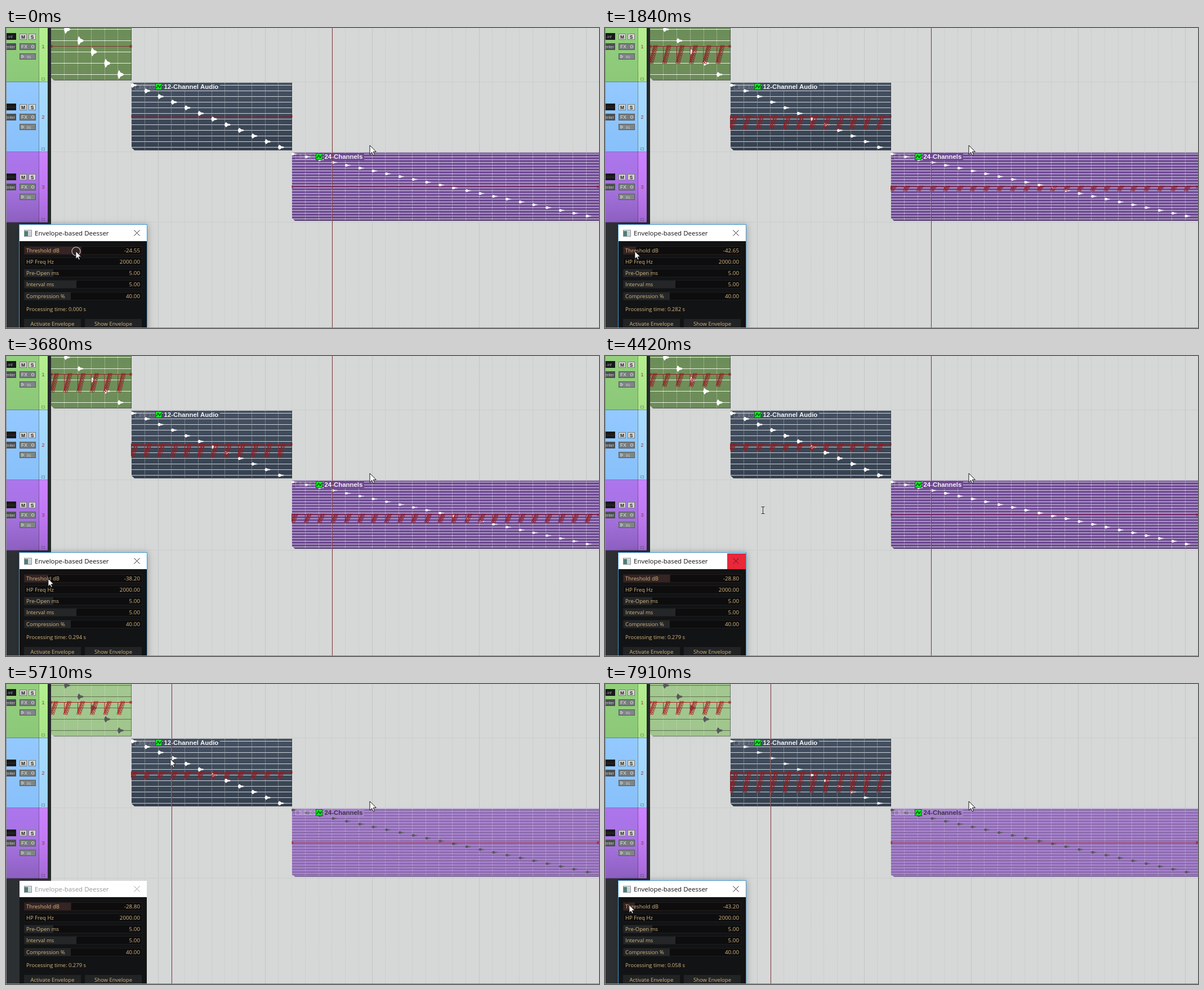
These frames come from a looping animation (1053 px wide and 532 px high, 8 s). An HTML page with a canvas:

```html
<!DOCTYPE html>
<html lang="en">
<head>
<meta charset="utf-8">
<title>Envelope-based Deesser</title>
<style>
html, body { margin: 0; width: 100%; height: 100%; overflow: hidden; background: #d6d8d7; }
canvas { display: block; }
</style>
</head>
<body>
<canvas id="stage" width="1053" height="532"></canvas>
<script>
const c = document.getElementById('stage').getContext('2d');
const W = 1053, H = 532, LOOP = 8000, TICK = 183.8, LEFT = 80, BEAT = 23.75;
const UI = '"Open Sans", "Noto Sans", sans-serif', SANS = '"Liberation Sans", Arial, sans-serif';

// tick, pointer x, pointer y, threshold, envelope depth on tracks 1, 2, 3
const keys = [
  [0, 124, 396, -24.55, 0, 0, 0],
  [2, 105, 396, -29, 0, 0, 0],
  [5, 82, 396, -36, 22, 13, 2],
  [6, 82, 396, -36, 22, 13, 2],
  [10, 53, 396, -42.65, 29, 22, 6],
  [12, 44, 396, -45.3, 38, 31, 25],
  [16, 35, 395, -47.45, 40, 34, 25],
  [18, 34, 395, -47.6, 40, 34, 25],
  [22, 115, 394, -28.8, 20, 10, 0],
  [23, 233, 362, -28.8, 20, 10, 0],
  [24, 280, 273, -28.8, 20, 10, 0],
  [27, 292, 133, -28.8, 20, 10, 0],
  [32, 292, 133, -28.8, 20, 10, 0],
  [35, 120, 396, -28.8, 20, 10, 0],
  [38, 187, 396, -12.37, 20, 0, 0],
  [39, 187, 396, -12.37, 20, 0, 0],
  [40, 158, 394, -12.37, 20, 0, 0],
  [43, 43, 392, -43.2, 20, 34, 0]
];

function stateAt(tick) {
  const i = keys.findIndex(k => k[0] > tick);
  if (i < 0) return keys[keys.length - 1];
  const a = keys[i - 1], b = keys[i], u = (tick - a[0]) / (b[0] - a[0]);
  return a.map((v, j) => v + (b[j] - v) * u);
}

function rect(x, y, w, h, fill) {
  c.fillStyle = fill;
  c.fillRect(x, y, w, h);
}

function box(x, y, w, h, stroke) {
  c.strokeStyle = stroke;
  c.lineWidth = 1;
  c.strokeRect(x + .5, y + .5, w - 1, h - 1);
}

function line(stroke, width, ...p) {
  c.strokeStyle = stroke;
  c.lineWidth = width;
  c.beginPath();
  for (let i = 0; i < p.length; i += 2) c.lineTo(p[i], p[i + 1]);
  c.stroke();
}

function poly(fill, ...p) {
  c.fillStyle = fill;
  c.beginPath();
  for (let i = 0; i < p.length; i += 2) c.lineTo(p[i], p[i + 1]);
  c.closePath();
  c.fill();
}

function ring(x, y, r) {
  c.beginPath();
  c.arc(x, y, r, 0, 7);
  c.stroke();
}

function text(s, x, y, fill, size, font = UI, align = 'left', weight = '') {
  c.font = `${weight} ${size}px ${font}`;
  c.textAlign = align;
  c.fillStyle = fill;
  c.fillText(s, x, y);
}

function dotted(stroke, ...p) {
  c.setLineDash([1, 1]);
  line(stroke, 1, ...p);
  c.setLineDash([]);
}

function vertical(colors, y0, y1) {
  const g = c.createLinearGradient(0, y0, 0, y1);
  colors.forEach((col, i) => g.addColorStop(i / (colors.length - 1), col));
  return g;
}

function arrange() {
  rect(0, 0, W, H, '#d6d8d7');
  for (let x = LEFT + BEAT, i = 1; x < W; x += BEAT, i++)
    dotted(i % 8 ? '#c4c7c6' : '#b0b3b2', Math.floor(x) + .5, 0, Math.floor(x) + .5, H);
  for (const y of [95.5, 219.5, 344.5]) dotted('#bfc2c1', LEFT, y, W, y);
}

function button(x, y, w, label) {
  rect(x, y, w, 11, '#d6d6d2');
  box(x, y, w, 11, '#7b7e78');
  text(label, x + w / 2, y + 9, '#222', 8.5, SANS, 'center', 'bold');
}

function trackPanel(n, top, h, y, panel, strip, meter) {
  rect(0, top, 58, h, vertical(panel, top, top + h));
  rect(58, top, 16, h, vertical(strip, top, top + h));
  rect(58, top, 1, h, 'rgba(0,0,0,.35)');
  rect(0, top + h - 1, 74, 1, 'rgba(0,0,0,.3)');
  rect(0, y - 6, 18, 12, '#17191a');
  if (n === 1) text('-inf', 2, y + 3, '#aaa', 7, SANS);
  else dotted(meter, 1, y + .5, 16, y + .5);
  button(24, y - 5, 13, 'M');
  button(40, y - 5, 13, 'S');
  rect(0, y + 12, 18, 12, '#4c5052');
  text('enter', 0, y + 21, '#d0d0d0', 7, SANS);
  rect(24, y + 12, 29, 12, '#777c7c');
  box(24, y + 12, 29, 12, '#555a5a');
  text('FX', 27, y + 21, '#e8e8e8', 8.5, SANS);
  c.strokeStyle = '#ddd';
  ring(47.5, y + 18, 2.3);
  rect(24, y + 30, 29, 11, '#7f8686');
  box(24, y + 30, 29, 11, '#555a5a');
  line('#ddd', 1, 28, y + 33, 32, y + 35.5, 28, y + 38, 28, y + 33);
  text('IN', 37, y + 38.5, '#ccc', 7, SANS);
  text(n, 66, y + 21, '#93303f', 9, SANS, 'center');
  box(63, top + h - 8, 6, 5, 'rgba(60,60,60,.4)');
}

function panels() {
  rect(0, 0, LEFT, H, '#2d3032');
  trackPanel(1, 0, 96, 15, ['#93cf7d', '#8bc878'], ['#b4ef90', '#a9e388'], '#333');
  trackPanel(2, 96, 124, 140, ['#93c9ff', '#88c0fb'], ['#a9dbff', '#9dd2fb'], '#a02a2a');
  trackPanel(3, 220, 125, 264, ['#ad75ee', '#a573df', '#8d5fc0'], ['#cb82ff', '#bf79f2', '#a469d5'], '#555');
  rect(74, 0, 6, 345, '#25282a');
}

// One gain dip per transient: a drop, then a slanted recovery of paired points
function envelope(o, depth) {
  const red = o.sel ? '#931d24' : '#b01c22', y = o.mid, end = Math.min(o.x1, W);
  line(depth < 1 ? 'rgba(140,20,40,.75)' : red, 1, o.x0, y + .5, end, y + .5);
  c.strokeStyle = red;
  c.strokeRect(o.x0 - 1, y - 1, 3, 3);
  c.strokeRect(end - 3, y - 1, 3, 3);
  if (depth < 1) return;
  const w = 4 + depth / 8, n = Math.ceil(depth / 4);
  for (let x = o.x0; x < end - 4; x += BEAT) {
    line(red, 1, x, y, x, y + depth, x + w, y);
    for (let i = 0; i <= n; i++) {
      const u = i / n, rise = x + w * u, v = y + .5 + depth * (1 - u);
      ring(rise, v, o.ring);
      ring(rise + 4, v, o.ring);
    }
  }
}

function item(o, depth) {
  const { x1, top, bottom, sel } = o, x0 = Math.ceil(o.x0), right = Math.min(x1, W);
  c.save();
  c.beginPath();
  c.rect(x0 - 1, 0, right - x0 + 2, H);
  c.clip();
  poly(vertical(sel ? o.dark : o.light, top, bottom),
    x0, top, x1, top, x1, bottom, x0 + 5, bottom, x0, bottom - 5);
  const wave = sel ? '#fff' : '#57585a', rule = sel ? o.rule : o.dimRule;
  const amp = o.amp * (1 - depth / 68);
  for (let k = 0; k < o.n; k++) {
    rect(x0, o.first + k * o.gap, right - x0, 1, rule);
    const x = Math.floor(o.x0 + k * BEAT) + .5;
    if (k) dotted(sel ? 'rgba(255,255,255,.55)' : 'rgba(255,255,255,.4)', x, top, x, bottom);
  }
  for (let k = 0; k < o.n; k++) {
    const y = o.first + k * o.gap + .5, x = o.x0 + k * BEAT;
    poly(wave, x - .5, y - 1, x + 1.5, y - amp, x + 3, y - amp * .8, x + 5, y - amp * .4, x + 8, y - amp * .3, x + 11, y,
      x + 8, y + amp * .3, x + 5, y + amp * .4, x + 3, y + amp * .8, x + 1.5, y + amp, x - .5, y + 1);
  }
  envelope(o, depth);
  line('rgba(50,50,60,.55)', 1, x0 + 5, bottom - .5, x1 - .5, bottom - .5, x1 - .5, top);
  if (o.name) label(o);
  c.restore();
}

function label({ x0, mark, name, nameW, sel, dark, light }) {
  const x = Math.floor(x0), y = mark;
  rect(x + 57, y, nameW + 4, 12, sel ? dark[0] : light[0]);
  c.globalAlpha = .45;
  for (let i = 0; i < 4; i++) {
    box(x + 7 + i * 9, y + 1, 8, 10, sel ? '#bbb' : '#eee');
    text('\u00b7MFX'[i], x + 11 + i * 9, y + 9, sel ? '#ccc' : '#fff', 7, SANS, 'center');
  }
  c.globalAlpha = 1;
  rect(x + 43, y, 12, 12, '#16e52c');
  box(x + 43, y, 12, 12, '#0a7014');
  line('#06380a', 1.2, x + 45, y + 9, x + 48, y + 3.5, x + 51, y + 8, x + 53, y + 4);
  text(name, x + 58.5, y + 10, sel ? '#f4f4f6' : '#3c3446', 11.4, SANS, 'left', 'bold');
}

const items = [
  { x0: LEFT, x1: 223, top: -27, bottom: 93, n: 6, gap: 20, first: -18, mid: 32, amp: 8, ring: 1.7,
    dark: ['#67885a', '#6f9058', '#6c8b59'], light: ['#a3c890', '#a0c58d'], rule: '#e8efe4', dimRule: '#5f7255' },
  { x0: 222.5, x1: 508, top: 97, bottom: 217, n: 12, gap: 10, first: 101, mid: 156, amp: 4.6, ring: 1.5,
    dark: ['#455162', '#3d4958', '#364150'], light: ['#8fa2b8', '#8799af'], rule: '#cfd4da', dimRule: '#566',
    mark: 98, name: '12-Channel Audio', nameW: 97 },
  { x0: 507.5, x1: 1080, top: 221, bottom: 342, n: 24, gap: 5, first: 223, mid: 281, amp: 2.6, ring: 1.5,
    dark: ['#6f4a93', '#73509a', '#6c4a8e'], light: ['#a681cc', '#a27dc8'], rule: '#d6cae2', dimRule: '#6d5688',
    mark: 222, name: '24-Channels', nameW: 68 }
];

function dialog(tick, value) {
  const active = tick < 30 || tick >= 35, ink = '#d6b781', body = '#121314';
  c.save();
  if (active) {
    c.shadowColor = 'rgba(0,0,0,.28)';
    c.shadowBlur = 11;
    c.shadowOffsetX = 2;
  }
  rect(24, 349, 226, 190, body);
  c.restore();
  rect(24, 349, 226, 29, '#fff');
  if (active) box(23, 348, 228, 190, '#3f9bd6');

  rect(32, 358, 14, 12, '#f0f0f0');
  rect(33, 360, 6, 9, '#4d7f78');
  rect(39, 360, 6, 9, '#ccd4d6');
  box(32, 358, 14, 12, '#8a9092');
  text('Envelope-based Deesser', 51, 368, active ? '#111' : '#999', 11.5);
  const red = tick >= 23 && tick < 25;
  if (red) rect(217, 350, 33, 28, '#e9283a');
  const cross = red ? '#5c1018' : active ? '#222' : '#999';
  line(cross, 1, 227.5, 358.5, 237.5, 368.5);
  line(cross, 1, 237.5, 358.5, 227.5, 368.5);

  const rows = [
    ['Threshold dB', value, 32 + (value + 48) * 209 / 48],
    ['HP Freq Hz', 2000, 32],
    ['Pre-Open ms', 5, 84],
    ['Interval ms', 5, 125],
    ['Compression %', 40, 115]
  ];
  rows.forEach(([name, v, edge], i) => {
    const y = Math.floor(387 + i * 20.3);
    rect(32, y, 209, 14, '#0d0d0e');
    rect(32, y, edge - 32, 14, i ? '#252627' : '#352424');
    box(32, y, 210, 15, i ? '#1c1d1e' : '#271b1b');
    text(name, 36, y + 10.5, ink, 9.5);
    text(v.toFixed(2), 238, y + 10.5, ink, 9.8, UI, 'right');
  });
  const spent = tick < 3 ? 0 : tick < 12 ? .282 : tick < 21 ? .294 : tick < 36 ? .279 : .058;
  text(`Processing time: ${spent.toFixed(3)} s`, 36, 501.5, ink, 9.5);
  [['Activate Envelope', 32], ['Show Envelope', 140]].forEach(([s, x]) => {
    rect(x, 516, 101, 16, '#222324');
    text(s, x + 50.5, 527.5, ink, 9.5, UI, 'center');
  });
}

function arrow(x, y, s) {
  c.save();
  c.translate(x, y);
  c.scale(s, s);
  poly('#fff', 0, 0, 0, 16, 3.7, 12.5, 6.2, 18, 8.6, 17, 6.2, 11.6, 11.3, 11.4);
  c.strokeStyle = '#111';
  c.lineWidth = 1;
  c.stroke();
  c.restore();
}

function pointer(tick, x, y) {
  if (tick < 3 || tick === 35 || tick === 39 || tick === 40) {
    c.strokeStyle = '#d8cdca';
    c.lineWidth = 1.1;
    ring(x + .5, y, 7.5);
  }
  const overText = x > 251 && !(y > 96 && y < 217);
  if (!overText) return arrow(x, y, .84);
  line('#333', 1, x - 2.5, y - 5.5, x + 3.5, y - 5.5);
  line('#333', 1, x - 2.5, y + 6.5, x + 3.5, y + 6.5);
  line('#333', 1, x + .5, y - 5, x + .5, y + 6);
}

function draw(now) {
  const tick = Math.floor((now % LOOP + 8) / TICK), [, x, y, value, ...depths] = stateAt(tick);
  const clicked = tick >= 30;
  arrange();
  items.forEach((o, i) => {
    o.sel = !clicked || i === 1;
    item(o, depths[i]);
  });
  panels();
  rect(clicked ? 294 : 579, 0, 1, H, '#7c3a3c');
  dialog(tick, value);
  rect(0, 0, 1, H, '#8b8d8d');
  rect(0, H - 1, W, 1, '#8b8d8d');
  arrow(646, 208, 1);
  pointer(tick, Math.round(x), Math.round(y));
}

const start = performance.now();
function frame() {
  draw(performance.now() - start);
  requestAnimationFrame(frame);
}
frame();
</script>
</body>
</html>
```
